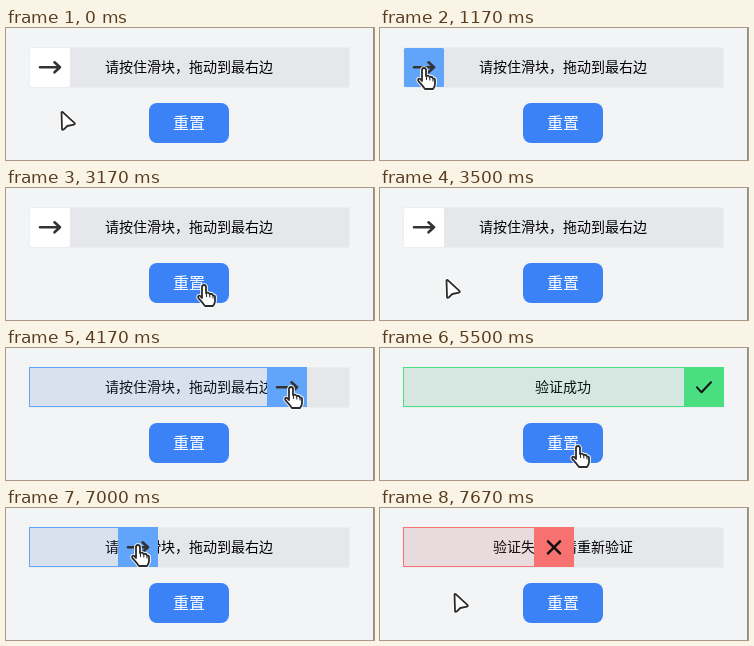
Recreate the animation shown at these times as an HTML page. Size 368 by 132 pixels, loop 8 s.

```html
<!DOCTYPE html>
<html lang="zh-CN">
<head>
<meta charset="utf-8">
<title>滑块验证</title>
<style>
  html, body { margin: 0; width: 100%; height: 100%; overflow: hidden; background: #f3f4f6; }
  svg { display: block; width: 368px; height: 132px; }
  text { font-family: "Noto Sans CJK SC", "Noto Sans CJK", "Noto Sans", sans-serif; text-anchor: middle; }
  .line { fill: none; stroke-linecap: round; stroke-linejoin: round; }
</style>
</head>
<body>
<svg viewBox="0 0 368 132">
  <rect width="368" height="132" fill="#f3f4f6"/>
  <rect x="367" width="1" height="132" fill="#8b8d91"/>
  <rect x="23.5" y="19.5" width="320" height="40" fill="#e5e7eb"/>
  <text id="message" x="183" y="44" font-size="14"></text>
  <rect id="trail" x="23.5" y="19.5" height="39" fill-opacity=".1"/>
  <rect id="handle" rx="1.5"/>
  <path id="icon" class="line"/>
  <rect x="143" y="75" width="80" height="40" rx="8" fill="#3b82f6"/>
  <text x="183" y="101" font-size="16" fill="#fff">重置</text>
  <g id="cursor" stroke-linejoin="round" stroke-linecap="round">
    <path id="halo" fill="#fff" stroke="#fff" stroke-width="3.6"/>
    <path id="outline" fill="#fff" stroke="#2b2b2b" stroke-width="1.8"/>
    <path id="fingers" d="M2.5 8V11.5M5.8 9V12M9 10.5V13" fill="none" stroke="#2b2b2b" stroke-width="1.1"/>
  </g>
</svg>
<script>
const TICK = 1000 / 6, LOOP = 8000;
const WHITE = '#fff', BLUE = '#60a5fa', RED = '#f87171', GREEN = '#4ade80';
const PROMPT = '请按住滑块，拖动到最右边', FAILED = '验证失败，请重新验证', PASSED = '验证成功';

// Icons are drawn around the handle's centre.
const ARROW = { d: 'M-10 0H10M4.5 -5L10 0L4.5 5', color: '#333', width: 2.6 };
const CROSS = { d: 'M-6 -6L6 6M6 -6L-6 6', color: '#111', width: 2.5 };
const CHECK = { d: 'M-7 0L-2.5 5L7 -5', color: '#111', width: 2 };

const LOOKS = {
  idle: { color: WHITE, text: PROMPT, icon: ARROW },
  drag: { color: BLUE, text: PROMPT, icon: ARROW },
  retry: { color: BLUE, text: FAILED, icon: CROSS },
  fail: { color: RED, text: FAILED, icon: CROSS },
  pass: { color: GREEN, text: PASSED, icon: CHECK }
};

const POINTER = 'M1.5 1.5L2 18Q2.3 19.5 3.6 18.6L7.3 15L14 13.7Q15.6 13 14.4 11.9L3 1.3Q2 .5 1.5 1.5Z';
const HAND = 'M-2 13V2Q-2 0 0 0Q2 0 2 2V8Q4.5 6.8 5.5 9Q8 8 9 10.3Q11.6 10.2 11 13V16Q11 18.5 9 21H1Q-1 18 -5.8 12.8Q-6.4 10.3 -4 10.8Z';

// [tick, look, cursor x, cursor y, handle offset], linear in between
const POSES = [
  [0, 'idle', 54, 83, 0], [3, 'idle', 54, 83, 0],
  [5, 'idle', 207, 92, 0], [7, 'idle', 44, 40, 0], [8, 'idle', 44, 40, 0],
  [9, 'drag', 64, 42, 20], [11, 'drag', 150, 45, 106], [12, 'fail', 154, 47, 110],
  [13, 'retry', 193, 50, 149], [14, 'fail', 195, 56, 150],
  [15, 'fail', 198, 97, 150], [18, 'fail', 198, 97, 150],
  [19, 'idle', 198, 97, 0], [21, 'idle', 65, 91, 0], [22, 'idle', 47, 42, 0],
  [23, 'drag', 110, 40, 63], [25, 'drag', 285, 39, 238], [26, 'drag', 328, 40, 281],
  [27, 'pass', 344, 62, 281], [29, 'pass', 312, 106, 281], [31, 'pass', 312, 106, 281],
  [32, 'pass', 158, 36, 281], [33, 'pass', 198, 98, 281], [34, 'pass', 198, 98, 281],
  [35, 'idle', 198, 98, 0], [40, 'idle', 43, 40, 0],
  [41, 'drag', 75, 38, 32], [42, 'drag', 132, 37, 89], [43, 'drag', 174, 38, 131],
  [44, 'fail', 174, 40, 131], [45, 'fail', 120, 94, 131], [46, 'fail', 73, 85, 131]
];

const $ = id => document.getElementById(id);
const set = (id, attrs) => {
  for (const [name, value] of Object.entries(attrs)) $(id).setAttribute(name, value);
};
const inside = (x, y, left, top, width, height) =>
  x >= left && x < left + width && y >= top && y < top + height;

function poseAt(tick) {
  const index = POSES.findLastIndex(pose => pose[0] <= tick);
  const from = POSES[index], to = POSES[index + 1] || from;
  const part = to === from ? 0 : (tick - from[0]) / (to[0] - from[0]);
  const mix = i => from[i] + (to[i] - from[i]) * part;
  return { look: from[1], x: Math.round(mix(2)), y: Math.round(mix(3)), offset: Math.round(mix(4)) };
}

function draw(ms) {
  const { look, x, y, offset } = poseAt(Math.floor(ms % LOOP / TICK + 1e-6));
  const { color, text, icon } = LOOKS[look];
  const idle = look === 'idle';
  const left = 23 + offset;
  const onHandle = inside(x, y, left, 19, 40, 40);
  const hand = onHandle || inside(x, y, 143, 75, 80, 40);

  $('message').textContent = text;
  set('trail', { width: offset + 39, fill: color, stroke: color, visibility: idle ? 'hidden' : 'visible' });
  set('handle', idle
    ? { x: 24, y: 20, width: 40, height: 39, fill: onHandle ? BLUE : WHITE }
    : { x: left, y: 19, width: 40, height: 40, fill: color });
  set('icon', {
    d: icon.d, stroke: icon.color, 'stroke-width': icon.width,
    transform: `translate(${left + (idle ? 21 : 20)} 39.3)`
  });
  set('halo', { d: hand ? HAND : POINTER });
  set('outline', { d: hand ? HAND : POINTER });
  set('fingers', { visibility: hand ? 'visible' : 'hidden' });
  set('cursor', { transform: `translate(${x} ${y})` });
}

const start = performance.now();
function frame() {
  draw(performance.now() - start);
  requestAnimationFrame(frame);
}
frame();
</script>
</body>
</html>
```
